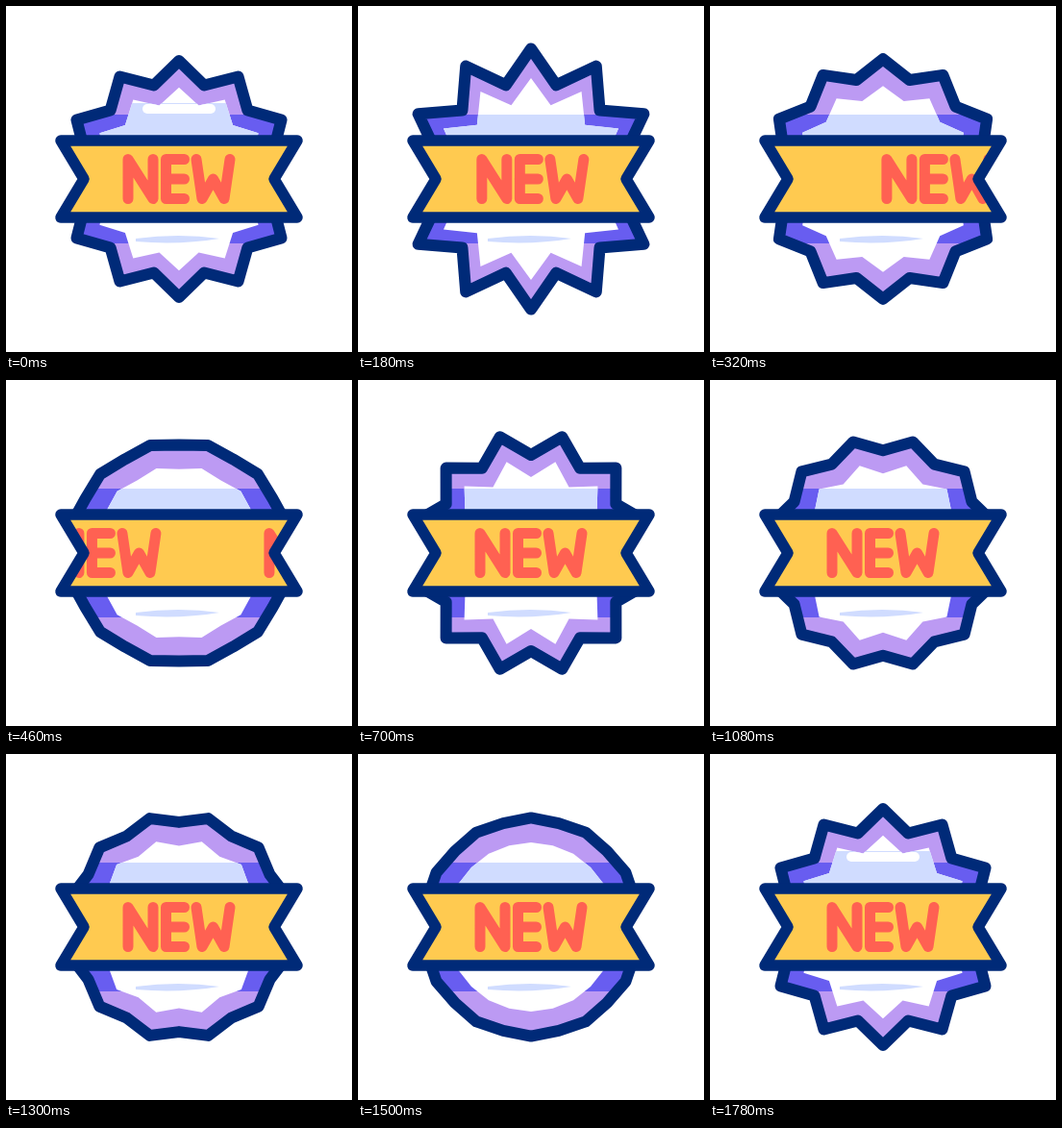
Animation of 360x360 px, one loop 1.8 s. Source, as an HTML page with a canvas:

```html
<!DOCTYPE html>
<html lang="en">
<head>
<meta charset="utf-8">
<title>New badge</title>
<style>
html, body { margin: 0; width: 100%; height: 100%; overflow: hidden; background: #fff; }
canvas { display: block; width: 360px; height: 360px; }
</style>
</head>
<body>
<canvas id="stage" width="360" height="360"></canvas>
<script>
const ctx = document.getElementById('stage').getContext('2d');
const LOOP = 1800, SIZE = 360, C = SIZE / 2, TEXT_GAP = 224;
const RIBBON = { half: 123, notch: 99, rise: 40 };
const LETTER_TOP = 159.5, LETTER_HEIGHT = 41;
const NAVY = '#002a78', VIOLET = '#bc9af3', DEEP = '#685df0',
      PALE = '#d0dcff', GOLD = '#ffca50', RED = '#ff6152';

// pen strokes name the keys of a number pad, 7 at top left
const LETTERS = [
  { x: 127, width: 26, taper: 0, strokes: ['1739'] },
  { x: 166.5, width: 19, taper: 0, strokes: ['9713', '46'] },
  { x: 198, width: 35, taper: 6, strokes: ['71539'] }
];

const mix = (a, b, k) => a + (b - a) * k;

function ease(t, from, to) {
  const u = Math.min(1, Math.max(0, (t - from) / (to - from)));
  return u * u * (3 - 2 * u);
}

// 0: points up, 1: points turned by half a step
function morph(t) {
  if (t < 700) return ease(t, 155, 680);
  if (t < 1330) return mix(1, 0.66, ease(t, 700, 1330));
  return mix(0.66, 0, ease(t, 1330, 1780));
}

// the points shoot out quickly, then settle
function bump(t) {
  const left = Math.max(0, 1 - (t - 100) / 600);
  return 17 * (t < 100 ? ease(t, 0, 100) : left * left);
}

function line(points) {
  const p = new Path2D();
  points.forEach(([x, y]) => p.lineTo(x, y));
  return p;
}

function polygon(points) {
  const p = line(points);
  p.closePath();
  return p;
}

function star(even, odd) {
  return polygon(Array.from({ length: 24 }, (_, i) => {
    const r = i % 2 ? odd : even, a = i * Math.PI / 12;
    return [C + r * Math.sin(a), C - r * Math.cos(a)];
  }));
}

function ribbonShape() {
  const { half, notch, rise } = RIBBON;
  const side = s => [[C + s * half, C + s * rise], [C + s * notch, C], [C + s * half, C - s * rise]];
  return polygon([...side(1), ...side(-1)]);
}

function letterStroke({ x, width, taper }, keys) {
  return line([...keys].map(key => {
    const col = (key - 1) % 3 / 2, down = 1 - Math.floor((key - 1) / 3) / 2;
    const inset = taper * down;
    return [x + inset + col * (width - 2 * inset), LETTER_TOP + down * LETTER_HEIGHT];
  }));
}

function rect(color, y, h) {
  ctx.fillStyle = color;
  ctx.fillRect(0, y, SIZE, h);
}

function stroke(path, color, width) {
  ctx.strokeStyle = color;
  ctx.lineWidth = width;
  ctx.stroke(path);
}

function drawInside(t) {
  const glare = t < 150 || t > 1640;
  const top = glare ? 101 : 113;
  rect('#fff', 0, SIZE);
  rect(PALE, top, C - RIBBON.rise - top);
  if (glare) {
    ctx.fillStyle = '#fff';
    ctx.beginPath();
    ctx.roundRect(142, 102, 76, 10, 5);
    ctx.fill();
  }
  // thin shade below the ribbon
  ctx.fillStyle = PALE;
  ctx.beginPath();
  ctx.moveTo(135, 242);
  ctx.quadraticCurveTo(C, 236, 222, 242);
  ctx.quadraticCurveTo(C, 249, 135, 245);
  ctx.fill();
}

function drawStar(t) {
  const m = morph(t);
  const even = mix(123, 102, m) + bump(t), odd = mix(101, 125, m);
  const outer = star(even, odd), inner = star(even * 0.775, odd * 0.785);
  const cut = C - RIBBON.rise;
  ctx.save();
  ctx.beginPath();
  ctx.rect(0, 0, SIZE, cut);
  ctx.rect(0, SIZE - cut, SIZE, cut);
  ctx.clip();

  ctx.save();
  ctx.clip(outer);
  rect(VIOLET, 0, SIZE);
  rect(DEEP, 113, 134);
  ctx.clip(inner);
  drawInside(t);
  ctx.restore();

  stroke(outer, NAVY, 12);
  ctx.restore();
}

function drawRibbon(t) {
  const shape = ribbonShape(), shift = TEXT_GAP * ease(t, 154, 661);
  ctx.fillStyle = GOLD;
  ctx.fill(shape);
  ctx.save();
  ctx.clip(shape);
  for (const dx of [shift, shift - TEXT_GAP]) {
    ctx.save();
    ctx.translate(dx, 0);
    for (const letter of LETTERS)
      for (const keys of letter.strokes) stroke(letterStroke(letter, keys), RED, 11);
    ctx.restore();
  }
  ctx.restore();
  stroke(shape, NAVY, 11.5);
}

function draw(t) {
  rect('#fff', 0, SIZE);
  ctx.lineJoin = ctx.lineCap = 'round';
  drawStar(t);
  drawRibbon(t);
}

const start = performance.now();
function tick() {
  draw((performance.now() - start) % LOOP);
  requestAnimationFrame(tick);
}
tick();
</script>
</body>
</html>
```
